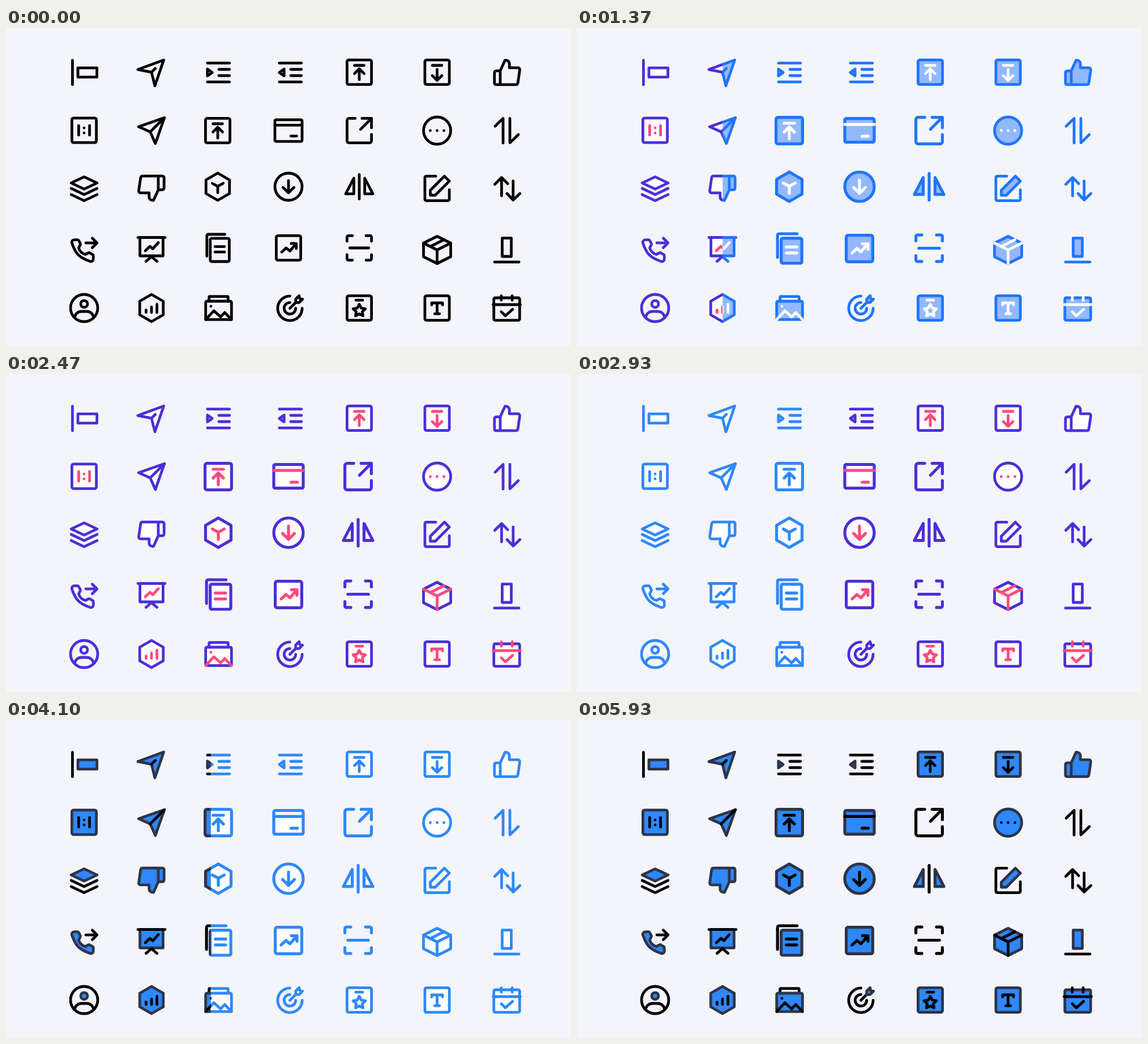
Animation of 998 by 561 pixels, one loop 5960 ms. Source, as an HTML page:

```html
<!DOCTYPE html>
<html lang="en">
<head>
<meta charset="utf-8">
<title>Icon themes</title>
<style>
html, body { margin: 0; width: 100%; height: 100%; overflow: hidden; background: #f4f5fb; }
svg { display: block; width: 100%; height: 100%; }
path { fill: none; stroke-width: 4; stroke-linecap: round; stroke-linejoin: round; }
.f { fill: var(--fill); stroke: var(--main); }
.i { stroke: var(--inner); }
.o { stroke: var(--open); }
</style>
</head>
<body>
<svg id="stage" viewBox="0 0 998 561"></svg>
<script>
const LOOP = 5960, WIDTH = 998, LEFT = 112;

// fill, shape outline, inner detail, open line
const themes = [
  ['none', '#000', '#000', '#000'],
  ['#92b8ff', '#1f75ff', '#fff', '#1f75ff'],
  ['#fff', '#4a2fd9', '#ff4a7c', '#4a2fd9'],
  ['#fff', '#2f88ff', '#2f88ff', '#2f88ff'],
  ['#2f88ff', '#2d3448', '#000', '#000']
];

// start time and speed (px per ms) of the wipe to each following theme
const wipes = [[0, .776], [1180, .764], [2474, .764], [3773, .764]];

const box = (x, y, w, h, r = 0) =>
  `M${x + r} ${y}h${w - 2 * r}a${r} ${r} 0 0 1 ${r} ${r}v${h - 2 * r}a${r} ${r} 0 0 1 ${-r} ${r}` +
  `h${2 * r - w}a${r} ${r} 0 0 1 ${-r} ${-r}v${2 * r - h}a${r} ${r} 0 0 1 ${r} ${-r}z`;
const ring = (x, y, r) => `M${x - r} ${y}a${r} ${r} 0 1 1 ${2 * r} 0a${r} ${r} 0 1 1 ${-2 * r} 0z`;

const f = (d, extra = '') => `<path class="f" d="${d}" ${extra}/>`;
const i = (d, extra = '') => `<path class="i" d="${d}" ${extra}/>`;
const o = d => `<path class="o" d="${d}"/>`;

const dot = 'stroke-width="5"';
const square = f(box(6, 6, 36, 36, 2.5));
const hexagon = f('M41.3 14L24 4 6.7 14v20L24 44l17.3-10z');
const toTop = square + i('M17 14H31M24 20V35M17 26L24 19 31 26');
const rows = 'M8 10.2H40.5M24.8 19.4H40.5M24.8 28.6H40.5M8 37.8H40.5';
const thumb = 'M14 22L21 6.5C25 6 27.5 8.5 27.5 12V17.5H40C42 17.5 43 19 42.7 21L40 39.5' +
  'C39.7 41.5 38.5 42.3 37 42.3H8C6.5 42.3 5.5 41.3 5.5 39.8V25C5.5 23 6.8 22 8.5 22ZM14 22V42';

// x, y, drawing on a 48 grid, and where it sits in the first theme if it is larger later
const icons = [
  [139, 78.5, f(box(14, 17.3, 28, 13.4)) + o('M6 6V42')],
  [257, 78, f('M42 6L4 20.1 24 24 29 44z') + o('M24 24L29.7 18.4')],
  [375, 78.5, o(rows) + f('M8 19V29L15 24z')],
  [502, 78.5, o(rows) + f('M15 19V29L8 24z')],
  [624, 78, toTop],
  [761.5, 78, square + i('M17 14H31M24 20V36M17 29L24 36 31 29')],
  [885, 78, f(thumb)],

  [138, 180.5, square + i('M16 17V31M32 17V31') + i('M24 20.5v0M24 27.8v0', dot)],
  [257, 181, f('M43 5L29.7 43 22.1 25.9 5 18.3z') + o('M43 5L22.1 25.9')],
  [375, 181, toTop, [374, 181]],
  [499, 180.5, f(box(4, 8, 40, 32, 2)) + i('M4 16H44M27.5 32H36'), [499, 181]],
  [622, 181, o('M28 6H42V20M42 29.5V39a3 3 0 0 1-3 3H9a3 3 0 0 1-3-3V9a3 3 0 0 1 3-3h9M25.8 22.2L41.1 6.9'), [624, 181]],
  [761.5, 181, f(ring(24, 24, 20)) + i('M14 24v0M24 24v0M34 24v0', dot)],
  [885, 181, o('M18.2 42.3V6L6.5 17.5M28.2 6V42L40.7 29.8')],

  [138, 283, f('M24 7L43 16 24 25 5 16z') + o('M5 24L24 33 43 24M5 33L24 42 43 33')],
  [257, 283, f(thumb, 'transform="rotate(180 24 24)"')],
  [375, 280, hexagon + i('M16 19L24 23.5 32 19M24 23.5V33'), [374, 280]],
  [499, 280, f(ring(24, 24, 20)) + i('M24 15V33M16 25L24 33 32 25'), [499, 280]],
  [622, 280, o('M24 6V42') + f('M16 11.5V34.5H4z') + f('M32 11.5V34.5H44z'), [624, 280]],
  [761.5, 283, o('M42 26v14a2 2 0 0 1-2 2H8a2 2 0 0 1-2-2V8a2 2 0 0 1 2-2h14') +
    f('M14 26.7V34h7.3L42 13.3 34.7 6z')],
  [885, 283, o('M16 35V8M6 18L16 8 25 17M33 13V41M24 31.5L33 41 43 31.5')],

  [138, 390.5, f('M14.2 10c.7 0 1.4.4 1.75 1l2.4 4.3c.3.6.3 1.3 0 1.9l-2.3 4.6s.7 3.4 3.5 6.2 6.2 3.5 6.2 3.5' +
    'l4.6-2.3c.6-.3 1.3-.3 1.9 0l4.3 2.4c.6.35 1 1 1 1.7v4.9c0 2.5-2.3 4.3-4.7 3.5' +
    '-4.9-1.7-12.5-4.8-17.4-9.6S7.7 19.6 6 14.7c-.8-2.4 1-4.7 3.5-4.7z') +
    o('M26.5 14.5H42.5M36 7.5L43 14.5 36 21.5')],
  [257, 390, f('M7 7H41V34H7z') + o('M4 7H44M16 42L24 35 32 42') + i('M15 26.5L21.5 20 26 23.5 34 14.5')],
  [375, 389, o('M8 36V6a2 2 0 0 1 2-2H34.5') + f(box(13, 10, 28, 34, 2)) + i('M20 22H34M20 30H34'), [374, 388]],
  [499, 389, square + i('M14 30L20.5 24 26 28.5 35 18M28 17.5H35.5V25'), [499, 388]],
  [622, 388.5, o('M6 14V8a2 2 0 0 1 2-2h6M34 6h6a2 2 0 0 1 2 2v6M42 34v6a2 2 0 0 1-2 2h-6' +
    'M14 42H8a2 2 0 0 1-2-2v-6M10 24H38'), [624, 388]],
  [761.5, 391.5, f('M44 14L24 4 4 14v20l20 10 20-10z') + i('M4 14L24 24 44 14M24 24V44M34 9L14 19')],
  [884.5, 391, f(box(17.3, 7, 13.4, 27)) + o('M6 42.3H42')],

  [138, 494, o(ring(24, 24, 20)) + f(ring(24, 18, 5)) +
    o('M10 38.3C10.4 33.1 14.7 29 20 29h8c5.3 0 9.6 4.1 10 9.3')],
  [257, 494, hexagon + i('M16 27V30.5M24 22.5V30.5M32 18.5V30.5')],
  [375.5, 494, o('M10 14V8a1 1 0 0 1 1-1H37a1 1 0 0 1 1 1v6') + f(box(5, 14, 38, 27, 2)) +
    i('M5 41L17 28 27 37 33 30.5 43 41') + i('M12.7 21.5v0', dot)],
  [501.5, 494.5, o('M24 6A18 18 0 1 0 42 24M24 15.5A8.5 8.5 0 1 0 32.5 24M24 24L33 15') +
    f('M32.5 15.5v-5l5-5 1 4 4 1-5 5z')],
  [624, 494, square + i('M19 12.5H29M24 18.5l3 5.7 6 1-4.5 4.3 1 6-5.5-2.8-5.5 2.8 1-6L15 25.2l6-1z')],
  [761.5, 494, square + i('M16 19.5V16.5H32V19.5M24 16.5V32.5M20.5 32.5H27.5')],
  [884.5, 494, f(box(5, 9, 38, 33, 2)) + i('M16 6V12.5M32 6V12.5M4 19H44M16 29.5L22 35.5 32.5 26')]
];

const place = ([x, y, art, first], t) => {
  const scale = first && t ? 1.3 : 1.2;
  if (first && !t) [x, y] = first;
  return `<g transform="translate(${x} ${y}) scale(${scale}) translate(-24 -24)">${art}</g>`;
};

const stage = document.getElementById('stage');
stage.innerHTML = themes.map(([fill, main, inner, open], t) =>
  `<clipPath id="c${t}"><rect height="561"/></clipPath>
  <g clip-path="url(#c${t})" style="--fill:${fill};--main:${main};--inner:${inner};--open:${open}">` +
  icons.map(icon => place(icon, t)).join('') + '</g>').join('');
const windows = stage.querySelectorAll('rect');

const edge = (wipe, time) =>
  Math.max(0, Math.min(WIDTH, time < wipe[0] ? 0 : LEFT + (time - wipe[0]) * wipe[1]));

let start;
function draw(now) {
  start ??= now;
  const time = (now - start) % LOOP;
  // each theme shows between the next wipe's edge and its own
  const edges = [WIDTH, ...wipes.map(w => edge(w, time)), 0];
  windows.forEach((rect, t) => {
    rect.setAttribute('x', edges[t + 1]);
    rect.setAttribute('width', Math.max(0, edges[t] - edges[t + 1]));
  });
  requestAnimationFrame(draw);
}
requestAnimationFrame(draw);
</script>
</body>
</html>
```
